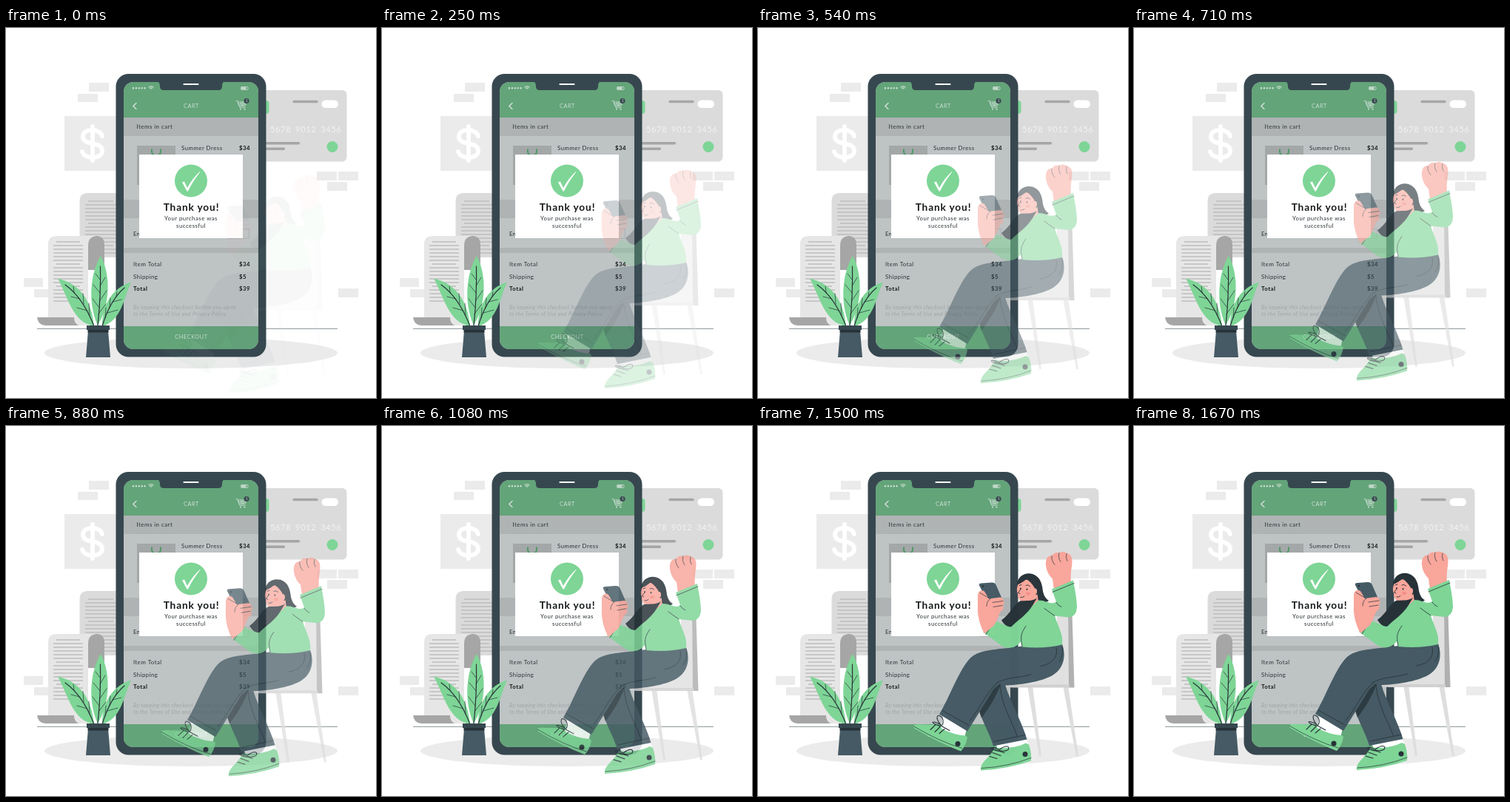
Write an HTML page that moves like this. It is 500x500 px and loops after 1710 ms.

```html
<!DOCTYPE html>
<html lang="en">
<head>
<meta charset="utf-8">
<title>Purchase complete</title>
<style>
  html, body { margin: 0; width: 100%; height: 100%; overflow: hidden; background: #fff; }
  svg { display: block; width: 100%; height: 100%; }
  text { font-family: Lato, "Open Sans", sans-serif; font-size: 7.8px; letter-spacing: .5px; fill: #2b3236; }
  .bold { font-weight: 700; fill: #15191b; }
  .mid { text-anchor: middle; }
  .fine { font-size: 7.3px; font-style: italic; letter-spacing: .3px; fill: #a0a5a6; }
  .bar { font-size: 7.2px; letter-spacing: .7px; fill: #cfe0d5; }
  .line { fill: none; stroke: #263238; stroke-linecap: round; stroke-linejoin: round; }
  .skin { fill: #f9a69b; }
  .green { fill: #7ed596; }
  .slate { fill: #455a64; }
  .navy { fill: #37474f; }
  .ink { fill: #263238; }
  .pale { fill: #ebebeb; }
  .grey { fill: #a6a6a6; }
</style>
</head>
<body>
<svg viewBox="0 0 500 500">
  <defs>
    <clipPath id="screen"><rect x="159" y="73" width="182" height="361" rx="13"/></clipPath>
  </defs>

  <!-- wall and floor -->
  <path class="pale" d="M112 74h27v12h-27zM97 89h27v11H97zM24 338h26v12H24zM38 353h25v11H38zM420 194h27v12h-27zM449 194h27v12h-27zM434 208h27v12h-27zM449 352h27v12h-27zM79 119h82v74H79z"/>
  <path d="M130 146C127 135 104 135 104 147C104 160 130 152 130 166C130 178 106 178 103 167M117 133V179" fill="none" stroke="#fff" stroke-width="5.800" stroke-linecap="round"/>
  <ellipse class="pale" cx="250" cy="439" rx="198" ry="21"/>
  <path d="M42 406.300H448" stroke="#37474f" stroke-width=".6"/>

  <!-- receipts -->
  <path d="M99.500 310V234Q99.500 223 111 223H160V310Z" fill="#dbdbdb"/>
  <path id="backLines" stroke="#bdbdbd" stroke-width="1.300"/>
  <path class="grey" d="M111 327V293Q111 281 122 281Q133 281 133 293V327Z"/>
  <path d="M57 392V292Q57 281 69 281H122Q111 282 111 294V402H98Q92 400 92 391Z" fill="#e6e6e6"/>
  <path class="grey" d="M42 391H92Q92 400 99 402H53Q43 401 42 391Z"/>
  <path id="frontLines" stroke="#bdbdbd" stroke-width="1.300"/>

  <!-- bank card -->
  <rect x="330" y="84" width="130.500" height="96.500" rx="6" fill="#dbdbdb"/>
  <rect class="green" x="335" y="98" width="20.500" height="18" rx="4"/>
  <path d="M389 99.500H420M340 155.700H395.500M340 163.300H375.500" stroke="#a6a6a6" stroke-width="3.400" stroke-linecap="round"/>
  <rect x="426.500" y="97.500" width="22.500" height="10.500" rx="5.200" fill="#fff"/>
  <text x="357" y="140.500" style="font-size:11.300px;letter-spacing:.5px;word-spacing:2.500px;fill:#f2f2f2">5678 9012 3456</text>
  <circle class="green" cx="441" cy="160.500" r="7.500"/>

  <!-- phone -->
  <rect class="navy" x="148.500" y="62" width="203" height="382.500" rx="17"/>
  <g clip-path="url(#screen)">
    <path d="M159 73H341V434H159Z" fill="#bec3c4"/>
    <path d="M159 121H341V146H159ZM159 232H341V257H159ZM159 297H341V304H159Z" fill="#afb3b4"/>
    <path d="M159 73H341V121H159ZM159 403H341V434H159Z" fill="#63a479"/>
    <path class="navy" d="M205 72H295Q292 74 292 78V79Q292 84 287 84H213Q208 84 208 79V78Q208 74 205 72Z"/>
  </g>
  <path d="M240.500 76H259.500" stroke="#fff" stroke-width="2.200" stroke-linecap="round"/>
  <g fill="none" stroke="#cfe0d5" stroke-linecap="round" stroke-linejoin="round">
    <path d="M172 81.300H188" stroke-width="2.500" stroke-dasharray="0 3.900"/>
    <path d="M193 80Q196 77.500 199 80M194.500 81.500Q196 80.300 197.500 81.500M196 83V83" stroke-width="1.100"/>
    <rect x="317.500" y="79.500" width="9.500" height="4" rx="1" stroke-width=".8"/>
    <path d="M319 81.500H323.500" stroke-width="2.500"/>
    <path d="M176 101.500L171.800 105.500L176 109.500" stroke-width="1.500"/>
    <path d="M311 98.500H313L316 107.500H323.500" stroke-width=".8"/>
    <path d="M313.500 100H325L323 105.500H315.500ZM314.500 102.700H324M317 100L318 105.500M319.500 100V105.500M322 100L321 105.500" stroke-width=".8"/>
    <path d="M317 109.700V109.700M322.500 109.700V109.700" stroke-width="2"/>
  </g>
  <circle class="navy" cx="325" cy="98.500" r="3.500"/>
  <text x="324" y="100.300" style="font-size:5px;letter-spacing:0;fill:#cfe0d5">1</text>
  <text class="bar mid" x="250.500" y="108">CART</text>
  <text class="bar mid" x="250.500" y="419.500">CHECKOUT</text>
  <text x="176.500" y="136">Items in cart</text>
  <path d="M177 159H229V212H177Z" fill="#a3a7a8"/>
  <path d="M197 163.500V167Q197 172 203 172Q209 172 209 167V163.500" fill="none" stroke="#509b69" stroke-width="2"/>
  <text x="237" y="165.300">Summer Dress</text>
  <text x="172" y="280.500" style="letter-spacing:.1px">Enter code</text>
  <rect x="300" y="271.500" width="28.500" height="13" fill="none" stroke="#a8adae" stroke-width=".8"/>
  <text x="172" y="321.800">Item Total</text>
  <text x="172" y="338.500">Shipping</text>
  <text class="bold" x="172" y="355">Total</text>
  <text class="bold" x="315" y="165.300">$34</text>
  <text class="bold" x="315" y="321.800">$34</text>
  <text class="bold" x="315" y="338.500">$5</text>
  <text class="bold" x="315" y="355">$39</text>
  <text class="fine" x="172" y="379.500">By tapping this checkout button you agree</text>
  <text class="fine" x="172" y="388.500">to the Terms of Use and Privacy Policy.</text>

  <!-- confirmation -->
  <path d="M180 171H320V284H180Z" fill="#fff"/>
  <circle class="green" cx="250" cy="206.500" r="22"/>
  <path d="M238 208.500L241 207.500L245 216Q252 203 262 194L262.500 194.500Q253 206 246 220.500H244.500Z" fill="#fff"/>
  <text class="bold mid" x="250.500" y="247" style="font-size:13.700px;letter-spacing:.85px">Thank you!</text>
  <text class="mid" x="250" y="260">Your purchase was</text>
  <text class="mid" x="250" y="269.800">successful</text>

  <!-- plant -->
  <path class="green" d="M124 402C110 372 114 330 128 308C142 334 141 374 124 402ZM119 403C90 398 84 364 70 338.500C99 345 116 368 119 403ZM130 403C130 372 145 351 169 343.500C159 365 156 396 130 403Z"/>
  <path class="line" stroke-width="1.200" d="M124 402C127 375 128 348 127.500 322M119 403C110 380 97 359 80 347M130 403C136 383 145 364 160 351"/>
  <path class="line" stroke-width=".7" d="M127 340L121 332M127.500 348L134 337M127 358L118 347M127 368L136 355M126 378L117 366M125 386L135 373M92 357L91 349M100 366L88 363M105 373L104 359M110 382L96 378M113 389L112 372M149 363L150 356M144 370L156 367M140 378L141 365M137 385L151 381M134 392L135 378"/>
  <path class="slate" d="M111 409H138L141 445H108Z"/>
  <path class="ink" d="M110.500 407H138.500V411.500H110.500Z"/>
  <path class="navy" d="M109 402H140V408H109Z"/>

  <g id="shopper">
    <!-- chair -->
    <path d="M364 350H371L383 446H380ZM412 350H419L433 446H430Z" fill="#dedede"/>
    <path d="M404 240H420L424 352H330V326H404Z" fill="#e0e0e0"/>
    <path d="M419 236H424L427.500 353H420Z" fill="#b0b0b0"/>
    <path d="M330 349H421V353H345Q336 353 330 349Z" fill="#d0d0d0"/>

    <!-- far leg and shoe -->
    <path d="M320 425L362 420L366 431L324 437Z" fill="#fff"/>
    <path class="green" d="M301 465C300 453 312 450 320 434C335 436 350 434 362 428L366 430Q370 441 369 452Q338 463 301 465Z"/>
    <path class="line" stroke-width=".7" d="M302 462Q338 460 369 448"/>
    <circle class="ink" cx="361" cy="443" r="3.500"/>
    <path class="line" stroke-width="1.100" d="M313 446L323 449M317 441L328 445M320 437L333 441M325 439C311 436 313 431 326 437C335 430 341 432 338 437Q333 440 326 438"/>
    <path class="slate" d="M296 375L324 338L334 349C342 375 357 400 363.500 423L318 432C313 414 301 396 296 375Z"/>
    <path class="ink" d="M296 375L329 346C321 368 309 385 302 394Z" opacity=".75"/>
    <path class="line" stroke-width=".8" d="M319 426L361 417M327 350C329 378 345 402 350 418"/>

    <!-- near leg and shoe -->
    <path d="M250 392L283 404L279 421L247 409Z" fill="#fff"/>
    <path class="green" d="M209.500 404C218 401 231 405 240 402C252 413 268 417 281 418L283 420Q281 432 274 439Q243 427 211 408Z"/>
    <path class="line" stroke-width=".7" d="M210 405Q245 426 276 435"/>
    <circle class="ink" cx="270" cy="429" r="3.500"/>
    <path class="line" stroke-width="1.100" d="M233 410L240 403M239 413L246 406M245 415L252 409M246 405C232 401 233 396 247 403M247 404C238 392 243 387 249 394Q252 400 248 405L259 411"/>
    <path class="slate" d="M357 297L411 294C417 311 413 328 397 337C382 345 354 350 332 350L323 347C312 366 296 391 283 412L245 389C261 362 271 330 287 313C301 300 327 302 357 297Z"/>
    <path class="line" stroke-width=".8" d="M249 384L285 404M323 347C306 363 300 382 286 398M322 347C337 338 356 340 369 335M403 299C406 314 396 321 382 324M411 298Q413 311 407 318"/>

    <!-- raised hand -->
    <path class="skin" d="M400 221L398 206C390 199 387 186 390 179Q393 174 397 175Q401 169 407 171Q412 168 417 171Q425 173 424.500 183C424 192 422 198 423 212Z"/>
    <path class="line" stroke-width=".7" d="M397 175Q396 181 401 187M407 171Q405 177 409 183M417 172Q415 177 418 182"/>

    <!-- hair, neck, sweater -->
    <path class="ink" d="M350 214C351 202 361 197 371 199.500C382 203 384 214 385 223Q387 232 393 235.500L374 247L355 232Z"/>
    <path class="skin" d="M364 231L377 222L379 238L367 250L356 246Z"/>
    <path class="green" d="M379 235C390 235 396 242 403 237L397 220L426 208C428 220 431 233 431 245Q430 257 420 258L401 256C405 270 413 281 411 295Q386 301 357 298L355 291C348 300 339 301 330 297L304 278L316 261L335 269C345 257 355 245 366 240L369 244Z"/>
    <path class="line" stroke-width=".8" d="M398 224L427 212M401 256Q392 250 387 246M403 238Q405 242 410 244M357 297C355 286 354 281 362 270M308 281L319 264"/>

    <!-- face -->
    <path class="skin" d="M352 211C350 218 349 221 351 226C351 234 356 239 362 237C370 236 377 230 377 222C377 208 362 203 352 211Z"/>
    <path class="ink" d="M350 214C352 200 368 196 377 204L382 225L375.500 228C376 216 368 211 363 206Q358 211 350 214Z"/>
    <ellipse class="skin" cx="374.500" cy="223" rx="2.500" ry="4"/>
    <path class="line" stroke-width=".9" d="M353 215L356 214M362 215Q365 213 367.500 216M355 220L351.500 225L354 226M355 231Q358 232 360 229.500"/>
    <path class="line" stroke-width="1.800" d="M355 219V219.500M363.500 220V220.500"/>
    <ellipse cx="365" cy="226" rx="3" ry="2" fill="#ef8078" opacity=".6"/>
    <path class="ink" d="M377 232C370 237 362 235 354 236C345 241 342 252 329 262C332 267 336 271 342 271C351 262 364 254 371 242Z"/>

    <!-- hand with mobile -->
    <path class="slate" d="M299 215Q298 212 302 212L316 211Q320 211 321.500 214L332 238L315 246Z"/>
    <circle class="ink" cx="304" cy="216" r="1.300"/>
    <path class="skin" d="M297 230C297 222 302 220 306 223L312 233L327 231Q331 231 331.500 235Q334 238 331 242Q333 248 328 250C324 257 323 263 319 269L306 280C300 270 296 254 297 243Z"/>
    <path class="line" stroke-width=".7" d="M300 225L312 232M317 238L331 236M318 244L330 242M314 233Q309 236 309 243"/>
  </g>
</svg>
<script>
  const LOOP = 1710, STEP = 1000 / 24, STEPS = 41, RISE = 30;
  const byId = id => document.getElementById(id);
  const shopper = byId('shopper');

  function ruled(id, left, right, top, bottom, gap) {
    let d = '';
    for (let y = top, i = 0; y <= bottom; y += gap, i++) {
      const inset = i % 6 ? 0 : 4;
      d += `M${left + inset} ${y}H${right - inset}`;
    }
    byId(id).setAttribute('d', d);
  }
  ruled('backLines', 107, 149, 234, 306, 5);
  ruled('frontLines', 64, 104, 289, 370, 5);

  // cubic-bezier(0, 0, .58, 1)
  function easeOut(x) {
    let low = 0, high = 1;
    for (let i = 0; i < 24; i++) {
      const s = (low + high) / 2;
      if (3 * (1 - s) * s * s * .58 + s ** 3 < x) low = s; else high = s;
    }
    return low * low * (3 - 2 * low);
  }

  function draw(now) {
    const step = Math.min(STEPS - 1, Math.floor((now % LOOP + 4.9) / STEP));
    const shown = easeOut((step + 1) / STEPS);
    shopper.setAttribute('opacity', shown);
    shopper.setAttribute('transform', `translate(0 ${RISE * (1 - shown)})`);
  }

  const start = performance.now();
  function tick() {
    draw(performance.now() - start);
    requestAnimationFrame(tick);
  }
  tick();
</script>
</body>
</html>
```
